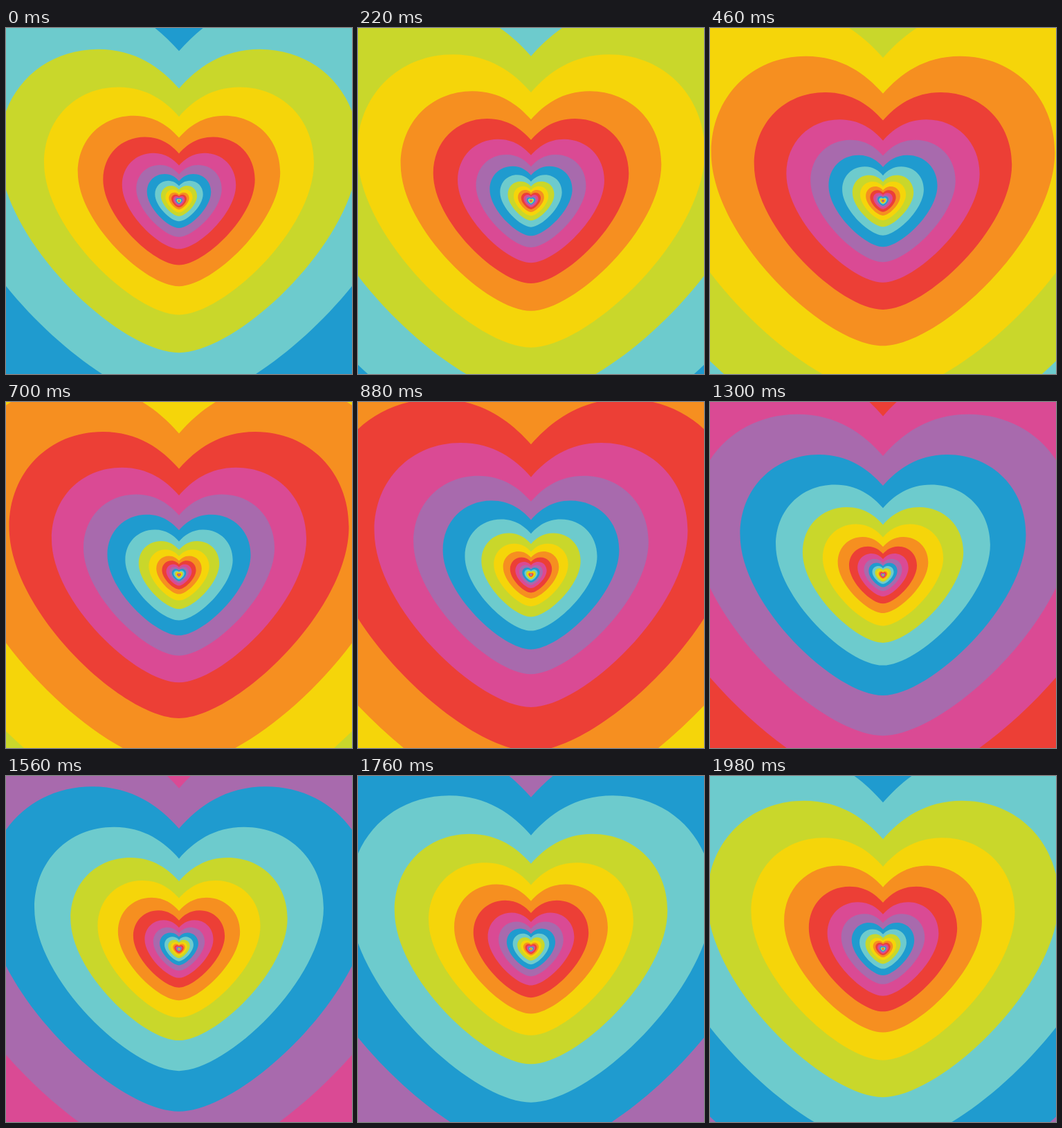
These frames come from a looping animation (500 by 500 pixels, 2000 ms). An HTML page with a canvas:

```html
<!DOCTYPE html>
<html lang="en">
<head>
<meta charset="utf-8">
<title>Rainbow heart tunnel</title>
<style>
html, body { margin: 0; width: 100%; height: 100%; overflow: hidden; }
canvas { display: block; width: 500px; height: 500px; }
</style>
</head>
<body>
<canvas width="500" height="500"></canvas>
<script>
const ctx = document.querySelector('canvas').getContext('2d');
const colors = ['#1f9bcf', '#6dcbcd', '#c9d72b', '#f5d50a', '#f68f20', '#ec3f36', '#da4a94', '#a86aad'];
const LOOP = 2000, TICK = 20, RATIO = 0.75, BASE = 462.2;

// Heart with a half width of 1, centred on the origin
const heart = new Path2D(`M0-.625
  C.1-.739 .24-.843 .449-.843 C.765-.843 1-.605 1-.283
  C1 .213 .33 .843 0 .843 C-.33 .843-1 .213-1-.283
  C-1-.605-.765-.843-.449-.843 C-.24-.843-.1-.739 0-.625Z`);

function draw(ms) {
  const steps = ms / LOOP * colors.length;
  const first = Math.floor(steps) - 2;
  for (let k = first; k < first + 26; k++) {
    const size = BASE * RATIO ** (k - steps);
    ctx.setTransform(size, 0, 0, size, 250, 250);
    ctx.fillStyle = colors[(k + colors.length) % colors.length];
    ctx.fill(heart);
  }
}

const start = performance.now();
function frame() {
  const ms = (performance.now() - start) % LOOP;
  draw(Math.floor(ms / TICK) * TICK);
  requestAnimationFrame(frame);
}
frame();
</script>
</body>
</html>
```
